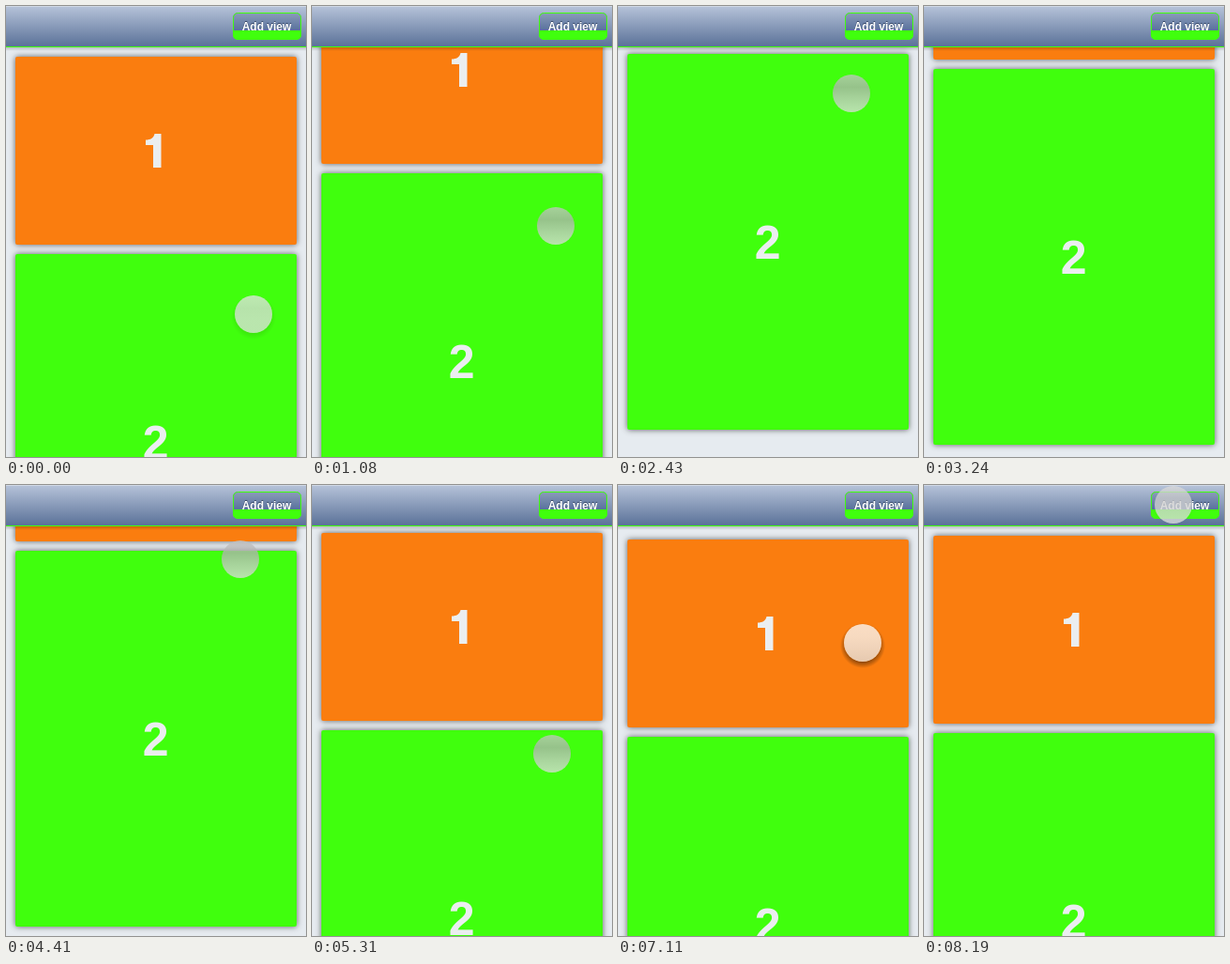
Recreate the animation shown at these times as an HTML page with a canvas. Size 320 px wide and 480 px high, loop 8.73 s.

```html
<!DOCTYPE html>
<html lang="en">
<head>
<meta charset="utf-8">
<title>Add view</title>
<style>
html, body { margin: 0; width: 100%; height: 100%; overflow: hidden; background: #e6ebf0; }
canvas { display: block; }
</style>
</head>
<body>
<canvas id="stage" width="320" height="480"></canvas>
<script>
const ctx = document.getElementById('stage').getContext('2d');
const LOOP = 8730, STEP = 90;
const MAX_SCROLL = 194, RUBBER = 0.58, DECAY = 235;
const RELEASE_1 = 2700, GRAB_2 = 4410, RELEASE_2 = 6650;
const FONT = '"Liberation Sans", Arial, sans-serif';
const GREEN = '#40ff0d', ORANGE = '#fa7d0f';

// finger route: time, x, y
const ROUTE = [
  [270, 264, 328], [1080, 260, 234], [2430, 249, 93], [2610, 250, 79],
  [GRAB_2, 250, 79], [5310, 256, 286], [5850, 258, 325], [6030, 258, 325],
  [RELEASE_2, 259, 340], [7110, 261, 168], [7830, 275, 36], [8010, 266, 21]
];

const clamp = (v, lo, hi) => Math.min(hi, Math.max(lo, v));
const ramp = (t, from, to) => clamp((t - from) / (to - from), 0, 1);
const lerp = (a, b, k) => a + (b - a) * k;

function finger(t) {
  const i = clamp(ROUTE.findLastIndex(p => p[0] <= t), 0, ROUTE.length - 2);
  const [t0, x0, y0] = ROUTE[i], [t1, x1, y1] = ROUTE[i + 1];
  const k = ramp(t, t0, t1);
  return { x: lerp(x0, x1, k), y: lerp(y0, y1, k) };
}

// content follows the finger after a short dead zone, stiffer past either end
function dragged(t) {
  const y = finger(t).y;
  const raw = t < GRAB_2 ? Math.max(0, 320 - y) : Math.min(MAX_SCROLL, 289 - y);
  const rest = clamp(raw, 0, MAX_SCROLL);
  return rest + (raw - rest) * RUBBER;
}

function settle(t, release) {
  const from = dragged(release), rest = clamp(from, 0, MAX_SCROLL);
  return rest + (from - rest) * Math.exp((release - t) / DECAY);
}

function scrollAt(t) {
  if (t > RELEASE_2) return settle(t, RELEASE_2);
  if (t > RELEASE_1 && t < GRAB_2) return settle(t, RELEASE_1);
  return dragged(t);
}

// 0 pressed, 1 hovering
function liftAt(t) {
  if (t < RELEASE_1) return 0.6 * (1 - ramp(t, 0, 180));
  if (t < 3500) return ramp(t, RELEASE_1, RELEASE_1 + 180);
  if (t < RELEASE_2) return 1 - ramp(t, 3960, 4140);
  return ramp(t, RELEASE_2, RELEASE_2 + 180) - 0.6 * ramp(t, 8010, 8190);
}

const opacityAt = t => 1 - ramp(t, RELEASE_1, 3060) + ramp(t, 3870, 4050);

function gradient(y0, y1, ...colors) {
  const g = ctx.createLinearGradient(0, y0, 0, y1);
  colors.forEach((c, i) => g.addColorStop(i / (colors.length - 1), c));
  return g;
}

function rect(x, y, w, h, fill) {
  ctx.fillStyle = fill;
  ctx.fillRect(x, y, w, h);
}

function roundBox(x, y, w, h, r) {
  ctx.beginPath();
  ctx.roundRect(x, y, w, h, r);
}

function circle(r) {
  ctx.beginPath();
  ctx.arc(0, 0, r, 0, Math.PI * 2);
}

function card(y, h, color) {
  ctx.save();
  ctx.shadowColor = 'rgba(0,0,0,0.6)';
  ctx.shadowBlur = 6;
  ctx.fillStyle = color;
  roundBox(10, y, 300, h, 2);
  ctx.fill();
  ctx.restore();
}

function drawCards(scroll) {
  const top = 54 - scroll;
  card(top, 200, ORANGE);
  card(top + 210, 400, GREEN);

  ctx.fillStyle = '#ebeef0';
  // plain "1" without a foot
  ctx.save();
  ctx.translate(149, top + 82);
  ctx.fill(new Path2D('M8 36V12H0V6.5C5 6.5 8.5 4.5 9.5 0H16.5V36Z'));
  ctx.restore();

  ctx.font = 'bold 50px ' + FONT;
  ctx.textAlign = 'center';
  ctx.fillText('2', 159.7, top + 428);
}

function drawBar() {
  rect(0, 44, 320, 4, gradient(44, 48, 'rgba(0,0,0,0.2)', 'rgba(0,0,0,0)'));
  rect(0, 0, 320, 43, gradient(0, 43, '#b6c3d9', '#5b7299'));
  rect(0, 0, 320, 1, '#d0d9e6');
  rect(0, 43, 320, 1, GREEN);

  ctx.save();
  roundBox(242, 7, 73, 29, 5);
  ctx.clip();
  rect(242, 7, 73, 20, gradient(7, 27, '#8c9dba', '#566f9c'));
  rect(242, 26, 73, 10, GREEN);
  ctx.restore();
  ctx.strokeStyle = GREEN;
  ctx.lineWidth = 1;
  roundBox(242.5, 7.5, 72, 28, 5);
  ctx.stroke();

  ctx.font = 'bold 12px ' + FONT;
  ctx.textAlign = 'center';
  ctx.fillStyle = 'rgba(30,45,75,0.7)';
  ctx.fillText('Add view', 278, 25);
  ctx.fillStyle = '#fff';
  ctx.fillText('Add view', 278, 26);
}

function drawTouch(t) {
  const { x, y } = finger(t), lift = liftAt(t);
  const gray = (v, a) => `rgba(${v},${v},${v},${a})`;
  ctx.save();
  ctx.globalAlpha = opacityAt(t);
  ctx.translate(Math.round(x), Math.round(y));

  // shadow only outside the ball
  ctx.save();
  circle(20);
  ctx.rect(-40, -40, 80, 80);
  ctx.clip('evenodd');
  const shade = ctx.createRadialGradient(0, 3, 16, 0, 3, 24);
  shade.addColorStop(0, gray(0, 0.5 * lift ** 3));
  shade.addColorStop(1, gray(0, 0));
  rect(-30, -30, 60, 60, shade);
  ctx.restore();

  const tone = (pressed, hovering) => gray(lerp(pressed, hovering, lift), 0.77);
  circle(20);
  ctx.fillStyle = gradient(-20, 20, tone(196, 250), tone(176, 246), tone(200, 236), tone(220, 224));
  ctx.fill();
  ctx.restore();
}

function draw(now) {
  const t = Math.floor((now % LOOP) / STEP) * STEP;
  rect(0, 0, 320, 480, '#e6ebf0');
  drawCards(Math.round(scrollAt(t)));
  drawBar();
  drawTouch(t);
}

const start = performance.now();
function tick() {
  draw(performance.now() - start);
  requestAnimationFrame(tick);
}
tick();
</script>
</body>
</html>
```
